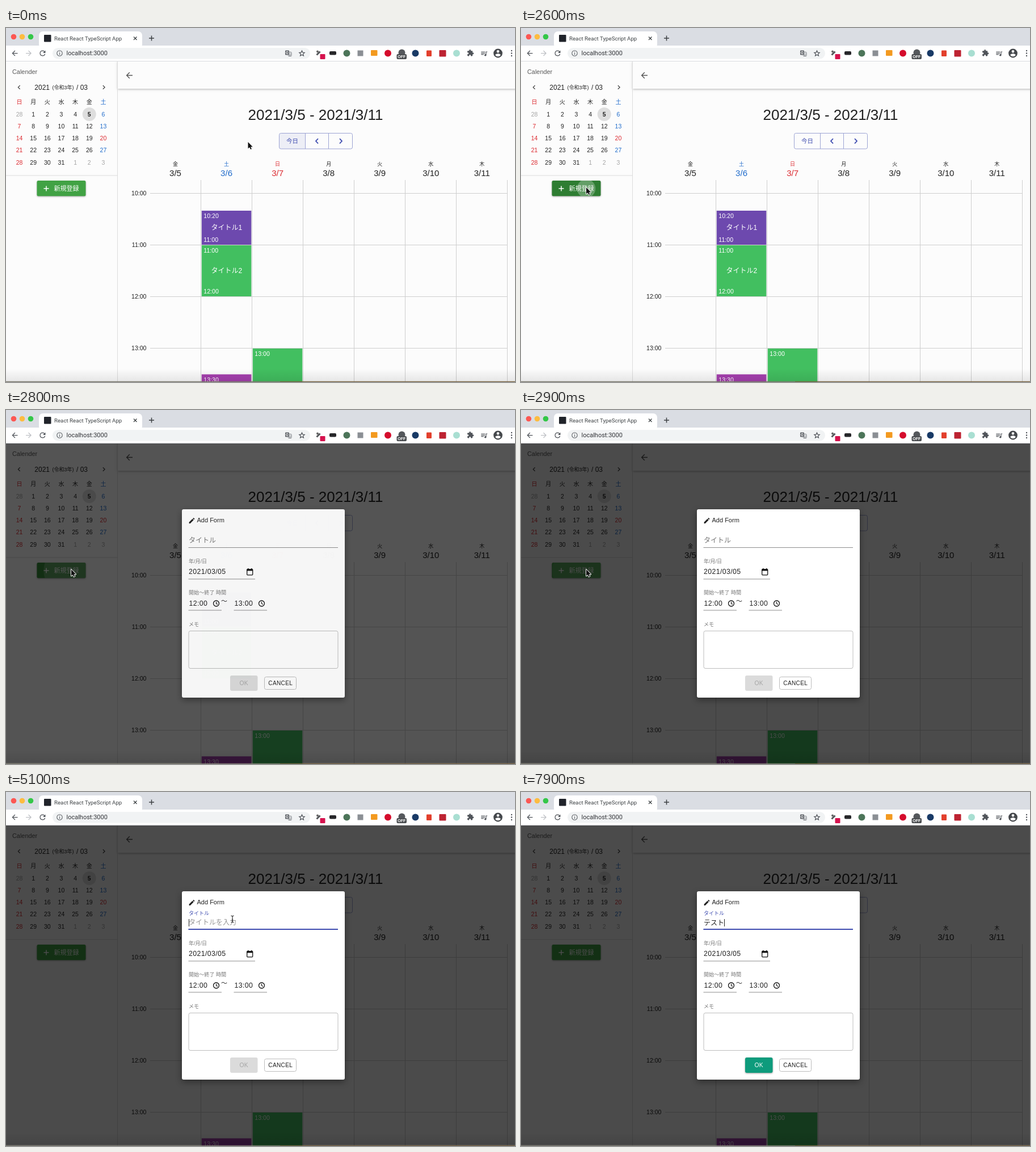
Animation, 897 px wide and 624 px high, one loop 8000 ms. Source, as an HTML page with a canvas:

```html
<!DOCTYPE html>
<html lang="ja">
<head>
<meta charset="utf-8">
<title>Calendar</title>
<style>
html, body { margin: 0; width: 100%; height: 100%; overflow: hidden; background: #fcfcfc; }
canvas { display: block; }
</style>
</head>
<body>
<canvas id="stage" width="897" height="624"></canvas>
<script>
const W = 897, H = 624, LOOP = 8000, STEP = 100;
const screen2d = document.getElementById('stage').getContext('2d');
const makeLayer = () => {
  const c = document.createElement('canvas');
  c.width = W; c.height = H;
  return c.getContext('2d');
};
const page = makeLayer(), dialog = makeLayer();
let g = screen2d;

const SANS = '"Liberation Sans","Noto Sans CJK JP",sans-serif';
const UI = 'Roboto,"Noto Sans",sans-serif';
const INK = '#212121', GREY = '#757575', RED = '#dc2a30', BLUE = '#1f6bcb', INDIGO = '#3f4db0';
const WEEK = '日月火水木金土';

const ICON = {
  back: 'M20 11H7.83l5.59-5.59L12 4l-8 8 8 8 1.41-1.41L7.83 13H20v-2z',
  left: 'M15.41 7.41L14 6l-6 6 6 6 1.41-1.41L10.83 12z',
  right: 'M10 6L8.59 7.41 13.17 12l-4.58 4.59L10 18l6-6z',
  reload: 'M17.65 6.35A8 8 0 0 0 12 4a8 8 0 1 0 7.73 10h-2.08A6 6 0 1 1 12 6c1.66 0 3.14.69 4.22 1.78L13 11h7V4z',
  pencil: 'M3 17.25V21h3.75L17.81 9.94l-3.75-3.75zM20.71 7.04a1 1 0 0 0 0-1.41l-2.34-2.34a1 1 0 0 0-1.41 0l-1.83 1.83 3.75 3.75z',
  puzzle: 'M20.5 11H19V7a2 2 0 0 0-2-2h-4V3.5a2.5 2.5 0 0 0-5 0V5H4a2 2 0 0 0-2 2v3.8h1.5a2.7 2.7 0 0 1 0 5.4H2V20a2 2 0 0 0 2 2h3.8v-1.5a2.7 2.7 0 0 1 5.4 0V22H17a2 2 0 0 0 2-2v-4h1.5a2.5 2.5 0 0 0 0-5z',
  user: 'M12 2a10 10 0 1 0 0 20 10 10 0 0 0 0-20zm0 3a3 3 0 1 1 0 6 3 3 0 0 1 0-6zm0 14.2a7.2 7.2 0 0 1-6-3.22c.03-1.99 4-3.08 6-3.08s5.97 1.09 6 3.08a7.2 7.2 0 0 1-6 3.22z',
  queue: 'M3 5h12v2H3zM3 9h12v2H3zM3 13h8v2H3zM17 5h5v2h-3v9a3 3 0 1 1-2-2.8z',
  star: 'M12 3l2.7 6.2 6.7.6-5.1 4.4 1.5 6.6-5.8-3.5-5.8 3.5 1.5-6.6L2.6 9.800l6.700-.6z',
  arrow: 'M0 0V11.500L2.700 9.200 4.500 13 6.400 12.200 4.700 8.500H8.200z'
};
for (const k in ICON) ICON[k] = new Path2D(ICON[k]);

const clamp = v => Math.max(0, Math.min(1, v));
const mix = (a, b, p) => a + (b - a) * p;
const ease = (t, start, dur) => { const p = clamp((t - start) / dur); return p * p * (3 - 2 * p); };
const blend = (a, b, p) => `rgb(${a.map((v, i) => Math.round(mix(v, b[i], p)))})`;

function rect(x, y, w, h, fill, r = 0) {
  g.fillStyle = fill;
  g.beginPath(); g.roundRect(x, y, w, h, r); g.fill();
}
function frame(x, y, w, h, color, r = 0, lw = 1) {
  g.strokeStyle = color; g.lineWidth = lw;
  g.beginPath(); g.roundRect(x, y, w, h, r); g.stroke();
}
function dot(x, y, r, fill) {
  g.fillStyle = fill;
  g.beginPath(); g.arc(x, y, r, 0, 7); g.fill();
}
function ring(x, y, r, color, lw = 1.2) {
  g.strokeStyle = color; g.lineWidth = lw;
  g.beginPath(); g.arc(x, y, r, 0, 7); g.stroke();
}
function line(color, lw, ...p) {
  g.strokeStyle = color; g.lineWidth = lw;
  g.beginPath();
  for (let i = 0; i < p.length; i += 2) g.lineTo(p[i], p[i + 1]);
  g.stroke();
}
function text(s, x, y, size, color = INK, align = 'left', o = {}) {
  g.font = `${o.weight || 400} ${size}px ${o.font || SANS}`;
  g.letterSpacing = (o.gap || 0) + 'px';
  g.textAlign = align; g.fillStyle = color;
  g.fillText(s, x, y);
}
function icon(name, cx, cy, size, color, stroke) {
  const k = size / 24;
  g.save();
  g.translate(cx - size / 2, cy - size / 2); g.scale(k, k);
  if (stroke) { g.strokeStyle = color; g.lineWidth = stroke / k; g.stroke(ICON[name]); }
  else { g.fillStyle = color; g.fill(ICON[name], 'evenodd'); }
  g.restore();
}
function shadow(blur, dy, alpha, draw) {
  g.save();
  g.shadowColor = `rgba(0,0,0,${alpha})`; g.shadowBlur = blur; g.shadowOffsetY = dy;
  draw();
  g.restore();
}

function drawBrowser() {
  rect(0, 0, W, 31, '#dadde3');
  rect(0, 31, W, 28, '#fff');
  rect(58, 6, 182, 30, '#fff', 7);
  ['#fc5753', '#fdbc40', '#34c748'].forEach((c, i) => dot(13.500 + 15 * i, 15.500, 4.800, c));
  rect(67, 12, 12.500, 12.500, '#20232a', 1);
  text('React React TypeScript App', 85, 21.500, 9.700, '#3c4043', 'left', { font: UI });
  line('#3c4043', 1.300, 225, 15.500, 230.500, 21);
  line('#3c4043', 1.300, 230.500, 15.500, 225, 21);
  line('#3c4043', 1.500, 252, 18, 261, 18);
  line('#3c4043', 1.500, 256.500, 13.500, 256.500, 22.500);

  icon('back', 15.500, 44.500, 15, '#50545a');
  g.save(); g.translate(80, 0); g.scale(-1, 1);
  icon('back', 40, 44.500, 15, '#bfc1c5');
  g.restore();
  icon('reload', 64.500, 44.500, 15, '#50545a');
  rect(82, 35, 454, 19.500, '#f1f3f4', 10);
  ring(94.500, 44.500, 4.700, '#5f6368', 1.100);
  line('#5f6368', 1.200, 94.500, 44, 94.500, 47.200);
  line('#5f6368', 1.200, 94.500, 41.700, 94.500, 42.900);
  text('localhost:3000', 106.500, 48.300, 11, '#303236', 'left', { font: UI });

  rect(492, 39.500, 7, 8, '#5f6368', 1);
  text('G', 495.500, 46, 6.500, '#fff', 'center', { weight: 700 });
  frame(497.500, 42.500, 5.500, 7, '#777b80', 1);
  text('文', 500.300, 48.500, 5, '#5f6368', 'center');
  icon('star', 521.500, 44.500, 12, '#50545a', 1.200);

  // toolbar extensions
  line('#55585c', 3, 547.500, 47.500, 553.500, 41.500);
  dot(549, 41.500, 2, '#666');
  rect(553.500, 46, 9, 9, '#d6124e', 1);
  rect(570, 41, 12, 6.500, '#27272a', 2);
  dot(600.500, 44.500, 6, '#4c7559');
  rect(619.500, 39.500, 10, 10, '#8b8f94');
  rect(643, 39, 11.500, 10, '#f39a20', 1);
  dot(673, 44.500, 6, '#d50c2c');
  dot(697.500, 43.500, 6, '#55585c');
  rect(688.500, 46, 17.500, 9, '#4a4d50', 2);
  text('OFF', 697.300, 53.300, 7, '#fff', 'center', { weight: 700 });
  dot(721.500, 44.500, 6, '#193a66');
  rect(741, 39.500, 9, 10.500, '#e23f2c', 1);
  rect(763.500, 39, 12, 11.500, '#bd2332', 1);
  dot(794, 44.500, 6, '#a9dfd2');
  icon('puzzle', 818.500, 44, 13, '#50545a');
  icon('queue', 842.500, 45.500, 14, '#50545a');
  icon('user', 867, 44.500, 19, '#45484c');
  [40, 44.500, 49].forEach(y => dot(891, y, 1.200, '#50545a'));
  rect(0, 58, W, 1, '#d9dbde');
}

function drawSidebar(t) {
  rect(196, 59, 1, H - 59, '#dcdcdc');
  text('Calender', 11, 81, 10.900, '#5a5a5a');
  icon('left', 23, 104.500, 15, '#444');
  icon('right', 172.500, 104.500, 15, '#444');
  text('2021', 50.300, 108.500, 12);
  text('(令和3年)', 81.500, 108.300, 9);
  text('/ 03', 124, 108.500, 12);

  const colX = c => 23.500 + 24.650 * c;
  dot(colX(5), 152, 12, '#dedede');
  for (let c = 0; c < 7; c++) {
    const base = c === 0 ? RED : c === 6 ? BLUE : INK;
    text(WEEK[c], colX(c), 134, 10, base, 'center');
    for (let r = 0; r < 5; r++) {
      const n = r * 7 + c;
      const out = n < 1 || n > 31;
      const day = n < 1 ? 28 : n > 31 ? n - 31 : n;
      const color = out ? '#a4a4a4' : n === 20 ? RED : base;
      text(day, colX(c), 155.700 + 21.250 * r, 10.500, color, 'center', { weight: n === 5 ? 700 : 400 });
    }
  }
  rect(0, 259.500, 196, 1, '#dedede');

  const hover = ease(t, 1500, 250) - ease(t, 2700, 250);
  shadow(2.500, 1, .35, () => rect(54.500, 269, 86, 27.300, blend([65, 162, 68], [46, 125, 50], hover), 2.500));
  const r = 62 * ease(t, 2415, 550);
  if (r > 0) {
    g.save();
    g.beginPath(); g.roundRect(54.500, 269, 86, 27.300, 2.500); g.clip();
    dot(115, 283, r, `rgba(255,255,255,${.25 * (1 - ease(t, 2650, 550))})`);
    g.restore();
  }
  line('#fff', 1.500, 66.500, 283, 75.500, 283);
  line('#fff', 1.500, 71, 278.500, 71, 287.500);
  text('新規登録', 84.500, 287, 11, '#fff');
}

function event(x, y, h, fill, start, end, title) {
  rect(x, y, 87.500, h, fill);
  text(start, x + 3.500, y + 13, 10.600, '#fff');
  if (!end) return;
  text(title, x + 44, y + h / 2 + 3.500, 12, '#fff', 'center');
  text(end, x + 3.500, y + h - 5.500, 10.600, '#fff');
}

function drawSchedule(t) {
  shadow(4, 1, .3, () => rect(197, 59, W, 48, '#fcfcfc'));
  icon('back', 217.300, 83.500, 17, '#555');
  text('2021/3/5 - 2021/3/11', 545.500, 162, 26, INK, 'center');

  rect(482, 186, 45, 27, `rgba(63,81,181,${.08 * (1 - ease(t, 0, 250))})`);
  frame(481.500, 185.500, 129, 27.500, '#9da4d4', 3);
  rect(527, 186, 1, 27, '#9da4d4');
  rect(568, 186, 1, 27, '#9da4d4');
  text('今日', 504.500, 203, 10.500, INDIGO, 'center');
  line(INDIGO, 1.800, 550, 195, 546, 199.300, 550, 203.600);
  line(INDIGO, 1.800, 588, 195, 592, 199.300, 588, 203.600);

  for (let i = 0; i < 7; i++) {
    const x = 298.500 + 90.050 * i;
    const color = i === 1 ? BLUE : i === 2 ? RED : INK;
    text(WEEK[(i + 5) % 7], x, 243, 9, color, 'center');
    text('3/' + (5 + i), x, 261, 15, color, 'center');
    rect(343 + 90 * i, 268, 1, H, '#cfcfcf');
  }
  for (let i = 0; i < 4; i++) {
    rect(254, 291 + 91 * i, 630, 1, '#cfcfcf');
    text(`${10 + i}:00`, 247.500, 295.200 + 91 * i, 10.600, INK, 'right');
  }
  event(344.800, 322, 60, '#6d49ae', '10:20', '11:00', 'タイトル1');
  event(344.800, 383, 90, '#42bf60', '11:00', '12:00', 'タイトル2');
  event(344.800, 610.500, 20, '#a53fae', '13:30');
  event(434.800, 565, 70, '#42bf60', '13:00');
}

function drawBottomEdge() {
  const fade = g.createLinearGradient(0, 600, 0, H);
  fade.addColorStop(0, 'rgba(0,0,0,0)');
  fade.addColorStop(1, 'rgba(0,0,0,.09)');
  g.fillStyle = fade; g.fillRect(0, 600, W, 24);
  rect(0, 622.700, 483, 1.300, '#777669');
  rect(483, 622.700, W, 1.300, '#75603f');
}

const CLICK_FIELD = 4700, COMMIT = 7700;
const TYPED = [[6200, 'ｔ'], [6400, 'て'], [6600, 'てｓ'], [6900, 'てす'], [7200, 'てすｔ'], [7300, 'てすと'], [7500, 'テスト']];

function drawTitleField(t) {
  const focus = ease(t, CLICK_FIELD, 200);
  const typed = TYPED.reduce((s, [at, v]) => t >= at ? v : s, '');
  text('タイトル', 322, mix(234, 217, focus), mix(12, 9, focus), blend([117, 117, 117], [63, 77, 176], focus));
  const hovered = t >= 4100 && t < CLICK_FIELD;
  rect(321.500, 242, 263.500, hovered ? 1.600 : 1, hovered ? '#222' : '#8d8d8d');
  if (!focus) return;
  rect(453.250 - 131.750 * focus, 241, 263.500 * focus, 2, INDIGO);
  if (!typed) text('タイトルを入力', 322, 234, 12, `rgba(0,0,0,${.42 * focus})`);
  text(typed, 322, 235, 12, INK);
  const w = 12 * typed.length;
  const composing = typed && t < COMMIT;
  if (composing) rect(322, 236.800, w - 1, 1, '#333');
  const since = t - (typed ? COMMIT : CLICK_FIELD);
  if (composing || since % 1000 < 500) rect(322 + w, 224, 1, 13, '#222');
}

function timeInput(x, value) {
  text(value, x + .500, 344.800, 12.300, INK, 'left', { gap: .4 });
  ring(x + 48.500, 341, 5, '#111', 1.300);
  line('#111', 1.100, x + 48.500, 338, x + 48.500, 341.300, x + 51, 342.800);
  rect(x - .500, 352.500, 58.500, 1, '#8d8d8d');
}

function drawDialog(t) {
  shadow(12, 4, .4, () => rect(310, 175, 287, 332, '#fff', 3));
  icon('pencil', 327.500, 195, 13, '#222');
  text('Add Form', 336.500, 198.300, 11);
  drawTitleField(t);

  text('年/月/日', 322, 270, 9, GREY);
  text('2021/03/05', 322, 289.300, 12.300, INK, 'left', { gap: .4 });
  rect(321.500, 297.500, 117.500, 1, '#8d8d8d');
  frame(424.700, 281, 10, 9.800, '#111', 1, 1.300);
  rect(424.300, 280.500, 10.800, 3, '#111');
  rect(426, 279, 1.500, 2, '#111');
  rect(432, 279, 1.500, 2, '#111');

  text('開始〜終了 時間', 322, 325, 9.100, GREY);
  timeInput(322, '12:00');
  text('〜', 384.500, 341, 11, INK, 'center');
  timeInput(402, '13:00');
  text('メモ', 322, 381, 9, GREY);
  frame(322, 389.500, 263, 66, '#bdbdbd', 3);

  const ready = ease(t, TYPED[0][0], 250);
  const fill = blend([219, 219, 219], [14, 155, 124], ready);
  shadow(3 * ready, ready, .4 * ready, () => rect(395, 468, 48.500, 27, fill, 3));
  text('OK', 419.300, 485.300, 10.300, blend([165, 165, 165], [255, 255, 255], ready), 'center', { gap: .3 });
  frame(455.500, 470.500, 56, 22, '#bcbcbc', 3);
  text('CANCEL', 483.700, 485, 10.100, INK, 'center', { gap: .3 });
}

function drawPointer(t) {
  if (t >= TYPED[0][0]) return;
  const a = ease(t, 200, 1300), b = ease(t, 3200, 1100);
  const x = mix(mix(426, 114.500, a), 399, b);
  const y = mix(mix(201, 281, a), 224, b);
  if (b && x > 321 && y < 245) {
    line('#222', 1.100, x, y - 5, x, y + 5);
    for (const s of [-1, 1]) line('#222', 1.100, x - 2.500, y + 6 * s, x, y + 5 * s, x + 2.500, y + 6 * s);
    line('#222', 1, x - 1.500, y + 2, x + 1.500, y + 2);
    return;
  }
  g.save();
  g.translate(x + .500, y);
  g.strokeStyle = '#fff'; g.lineWidth = 1.800; g.lineJoin = 'round';
  g.stroke(ICON.arrow);
  g.fillStyle = '#111'; g.fill(ICON.arrow);
  g.restore();
}

function draw(t) {
  g = page;
  rect(0, 0, W, H, '#fcfcfc');
  drawSchedule(t);
  drawSidebar(t);
  drawBottomEdge();
  const open = ease(t, 2605, 225);
  rect(0, 59, W, 563.700, `rgba(0,0,0,${.7 * open})`);
  drawBrowser();

  g = dialog;
  g.clearRect(0, 0, W, H);
  if (open) drawDialog(t);

  g = screen2d;
  g.drawImage(page.canvas, 0, 0);
  g.globalAlpha = open;
  g.drawImage(dialog.canvas, 0, 0);
  g.globalAlpha = 1;
  drawPointer(t);
}

const began = performance.now();
function tick() {
  const now = (performance.now() - began) % LOOP;
  draw(Math.floor(now / STEP) * STEP);
  requestAnimationFrame(tick);
}
tick();
</script>
</body>
</html>
```
